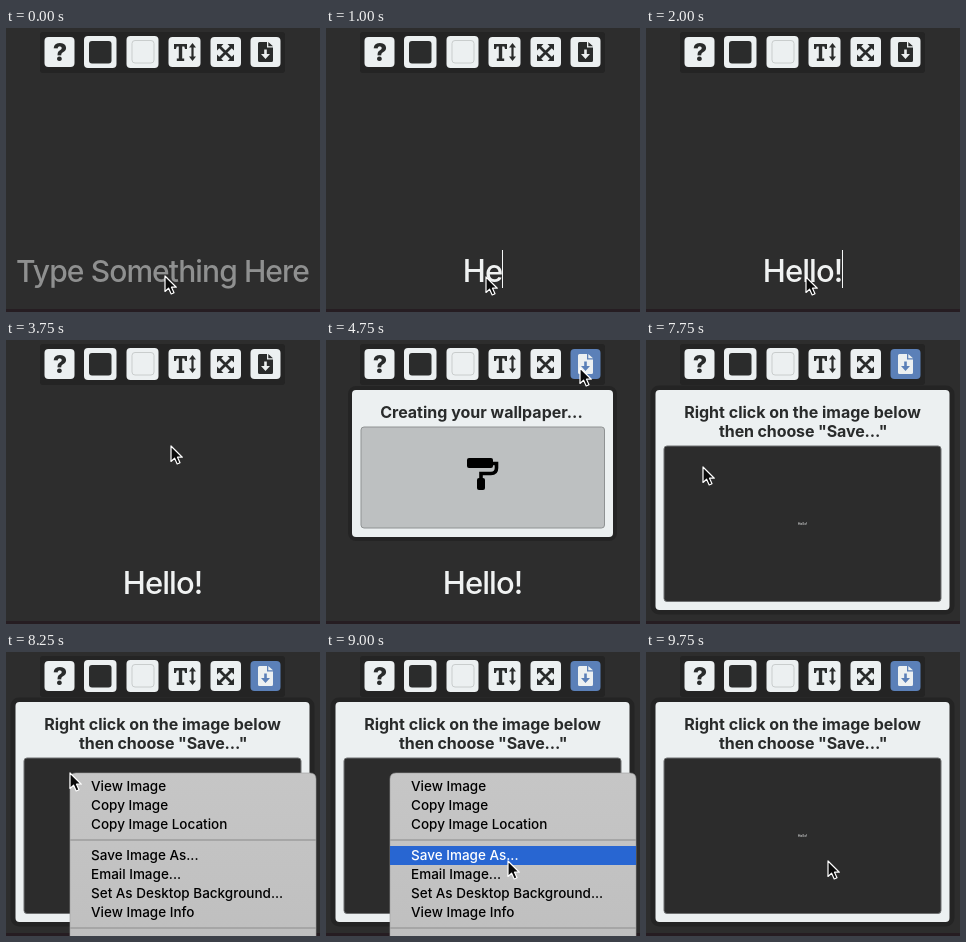
An HTML page that plays this animation: 314 by 284 pixels, repeating every 10 s.

```html
<!DOCTYPE html>
<html lang="en">
<head>
<meta charset="utf-8">
<title>Wallpaper maker</title>
<style>
  html, body { margin: 0; width: 100%; height: 100%; overflow: hidden; background: #2d2d2d; }
  #stage { position: relative; width: 314px; height: 284px; overflow: hidden; font-family: Inter, sans-serif; font-optical-sizing: none; }
  svg { position: absolute; left: 0; top: 0; font-family: Inter, sans-serif; }

  .field { position: absolute; left: 0; top: 224px; width: 313px; height: 38px; font-size: 31px; font-weight: 450; line-height: 38px; text-align: center; white-space: nowrap; color: #f0f2f2; }
  .hint { font-size: 30px; letter-spacing: -.03em; color: #8f9090; }
  .typed { position: relative; display: inline-block; height: 38px; }
  .typed b { font-weight: 450; letter-spacing: -.03em; }
  .caret { position: absolute; left: 100%; top: -2px; width: 1px; height: 38px; background: #f4f6f6; }

  /* Every part shares one ten-second clock with hard steps. */
  .hint, .caret, .typed b, .hot, .making, .ready, .menu, .bar, .copy, .save, .pointer {
    animation: 10s step-end infinite;
  }
  .hint { animation-name: hint; }
  .caret { animation-name: caret; }
  .typed b:nth-child(1) { animation-name: key1; }
  .typed b:nth-child(2) { animation-name: key2; }
  .typed b:nth-child(3) { animation-name: key3; }
  .typed b:nth-child(4) { animation-name: key4; }
  .typed b:nth-child(5) { animation-name: key5; }
  .typed b:nth-child(6) { animation-name: key6; }
  .hot { animation-name: hot; }
  .making { animation-name: making; }
  .ready { animation-name: ready; }
  .menu { animation-name: menu; }
  .bar { animation-name: bar; }
  .copy { animation-name: copy; }
  .save { animation-name: save; }
  .pointer { animation-name: pointer; }
  .roller { animation: roll 1s step-end infinite; }

  @keyframes hint { 0% { opacity: 1 } 7.5%, 100% { opacity: 0 } }
  @keyframes caret {
    0% { opacity: 0 } 2.5% { opacity: 1 } 25% { opacity: 0 }
    30% { opacity: 1 } 35% { opacity: 0 } 40% { opacity: 1 } 45%, 100% { opacity: 0 }
  }
  @keyframes key1 { 0% { font-size: 0 } 7.5%, 100% { font-size: 31px } }
  @keyframes key2 { 0% { font-size: 0 } 10%, 100% { font-size: 31px } }
  @keyframes key3 { 0% { font-size: 0 } 12.5%, 100% { font-size: 31px } }
  @keyframes key4 { 0% { font-size: 0 } 15%, 100% { font-size: 31px } }
  @keyframes key5 { 0% { font-size: 0 } 17.5%, 100% { font-size: 31px } }
  @keyframes key6 { 0% { font-size: 0 } 20%, 100% { font-size: 31px } }
  @keyframes hot { 0% { fill: #ecf0f1; color: #292b2b } 42.5%, 100% { fill: #5b80b8; color: #ecf0f1 } }
  @keyframes making { 0% { opacity: 0 } 45% { opacity: 1 } 67.5%, 100% { opacity: 0 } }
  @keyframes ready { 0% { opacity: 0 } 67.5%, 100% { opacity: 1 } }
  @keyframes menu { 0% { opacity: 0 } 82.5% { opacity: 1 } 97.5%, 100% { opacity: 0 } }
  @keyframes bar {
    0% { opacity: 0; transform: translateY(-50px) } 85% { opacity: 1; transform: translateY(-50px) }
    87.5%, 100% { opacity: 1; transform: none }
  }
  @keyframes copy { 0% { fill: #000 } 85% { fill: #fff } 87.5%, 100% { fill: #000 } }
  @keyframes save { 0% { fill: #000 } 87.5%, 100% { fill: #fff } }
  @keyframes roll {
    0% { transform: translate(141px, 130px) } 25% { transform: translate(141px, 124px) }
    50% { transform: translate(141px, 112px) } 75%, 100% { transform: translate(141px, 118px) }
  }
  @keyframes pointer {
    0% { transform: translate(159px, 248px) }
    5% { transform: translate(160px, 249px) }
    30% { transform: translate(157px, 250px) }
    32.5% { transform: translate(115px, 222px) }
    35% { transform: translate(106px, 168px) }
    37.5% { transform: translate(165px, 106px) }
    40% { transform: translate(243px, 59px) }
    42.5% { transform: translate(254px, 28px) }
    72.5% { transform: translate(198px, 56px) }
    75% { transform: translate(104px, 104px) }
    77.5% { transform: translate(57px, 127px) }
    80% { transform: translate(64px, 121px) }
    85% { transform: translate(104px, 150px) }
    87.5% { transform: translate(160px, 197px) }
    90%, 100% { transform: translate(182px, 209px) }
  }
</style>
</head>
<body>
<div id="stage">
  <svg width="314" height="284">
    <rect width="314" height="284" fill="#2d2d2d"/>
    <rect y="281" width="314" height="3" fill="#261d22"/>
    <rect x="34" y="4" width="245" height="41" rx="3" fill="#242424"/>

    <g fill="#ecf0f1">
      <rect x="38.500" y="9" width="30" height="30" rx="4"/>
      <rect x="78" y="8" width="32.500" height="32" rx="4"/>
      <rect x="120.500" y="8" width="32" height="32" rx="4"/>
      <rect x="162.500" y="9" width="32" height="30" rx="4"/>
      <rect x="204.500" y="9" width="30.500" height="30" rx="4"/>
    </g>
    <rect x="83" y="13" width="22.500" height="22.500" rx="3" fill="#2b2c2c"/>
    <rect x="126" y="12.500" width="22" height="22.500" rx="3" fill="#ecf0f1" stroke="#c9cdcd"/>

    <g fill="#292b2b">
      <text x="54" y="33" font-size="25" font-weight="800" text-anchor="middle">?</text>
      <path d="M168 16H181V21H179L178.300 18.500H176.200V30.500H178.200V33H170.800V30.500H172.800V18.500H170.700L170 21H168Z"/>
      <path d="M186.500 15L190 19.500H187.600V28.500H190L186.500 33L183 28.500H185.400V19.500H183Z"/>
      <path d="M211 16H217.500L211 22.500ZM228 16V22.500L221.500 16ZM211 33V26.500L217.500 33ZM228 33H221.500L228 26.500Z"/>
      <path d="M213.500 18.500L225.500 30.500M225.500 18.500L213.500 30.500" stroke="#292b2b" stroke-width="2.800"/>
    </g>

    <g class="hot">
      <rect x="244.500" y="9" width="30" height="30" rx="4"/>
      <path d="M253.500 14H261V19.500H267V32.500Q267 34 265.500 34H253.500Q252 34 252 32.500V15.500Q252 14 253.500 14ZM262.300 14L267 18.300H262.300Z" fill="currentColor"/>
      <path d="M258.200 21.500H260.800V26H264L259.500 31L255 26H258.200Z"/>
    </g>
  </svg>

  <div class="field hint">Type Something Here</div>
  <div class="field"><span class="typed"><b>H</b><b>e</b><b>l</b><b>l</b><b>o</b><b>!</b><i class="caret"></i></span></div>

  <svg width="314" height="284">
    <defs>
      <linearGradient id="glass" x2="0" y2="1">
        <stop stop-color="#c6c6c6"/>
        <stop offset="1" stop-color="#bfbfbf"/>
      </linearGradient>
    </defs>

    <g class="making">
      <rect x="26" y="50" width="261" height="147" rx="4" fill="none" stroke="#000" stroke-opacity=".2" stroke-width="8"/>
      <rect x="26" y="50" width="261" height="147" rx="4" fill="#ecf0f1"/>
      <text x="155.500" y="78" font-size="16" font-weight="650" text-anchor="middle" fill="#292b2b">Creating your wallpaper...</text>
      <rect x="35" y="87" width="243.500" height="101" rx="3" fill="#bdc0c1" stroke="#8f9293"/>
      <g class="roller">
        <rect width="26" height="10" rx="2"/>
        <path d="M26 5.500H29.500V10Q29.500 15.500 24 15.500H14V22" fill="none" stroke="#000" stroke-width="3.600"/>
        <rect x="10" y="20" width="8" height="12" rx="2"/>
      </g>
    </g>

    <g class="ready">
      <rect x="9" y="50" width="295" height="220" rx="4" fill="none" stroke="#000" stroke-opacity=".2" stroke-width="9"/>
      <rect x="9.500" y="50" width="294" height="220" rx="4" fill="#ecf0f1"/>
      <g font-size="16" font-weight="650" text-anchor="middle" fill="#292b2b">
        <text x="156.500" y="78">Right click on the image below</text>
        <text x="157.200" y="97" letter-spacing="-.12">then choose "Save..."</text>
      </g>
      <rect x="18" y="106" width="277" height="155.500" rx="3" fill="#2c2c2c" stroke="#6f7172"/>
      <text x="156.500" y="185" font-size="3.600" text-anchor="middle" fill="#f0f2f2">Hello!</text>
    </g>

    <g class="menu">
      <path d="M64 290V127Q64 121 70 121H304Q310 121 310 127V290Z" fill="url(#glass)" stroke="#a0a0a0" stroke-width=".6"/>
      <path d="M64 188H310M64 276H310" stroke="#a6a6a6" stroke-width="2"/>
      <rect class="bar" x="64" y="194" width="246" height="19" fill="#2866d2"/>
      <g font-size="13.500" font-weight="470" fill="#000">
        <text x="85" y="139">View Image</text>
        <text class="copy" x="85" y="158">Copy Image</text>
        <text x="85" y="177">Copy Image Location</text>
        <text class="save" x="85" y="208">Save Image As...</text>
        <text x="85" y="227">Email Image...</text>
        <text x="85" y="246">Set As Desktop Background...</text>
        <text x="85" y="265">View Image Info</text>
      </g>
    </g>

    <path class="pointer" d="M0 0V15.500L3.600 12.200L6.200 18L9 16.800L6.500 11.200H11.300Z" fill="#0a0a0a" stroke="#fff" stroke-width="1.200" stroke-linejoin="round"/>
  </svg>
</div>
</body>
</html>
```
